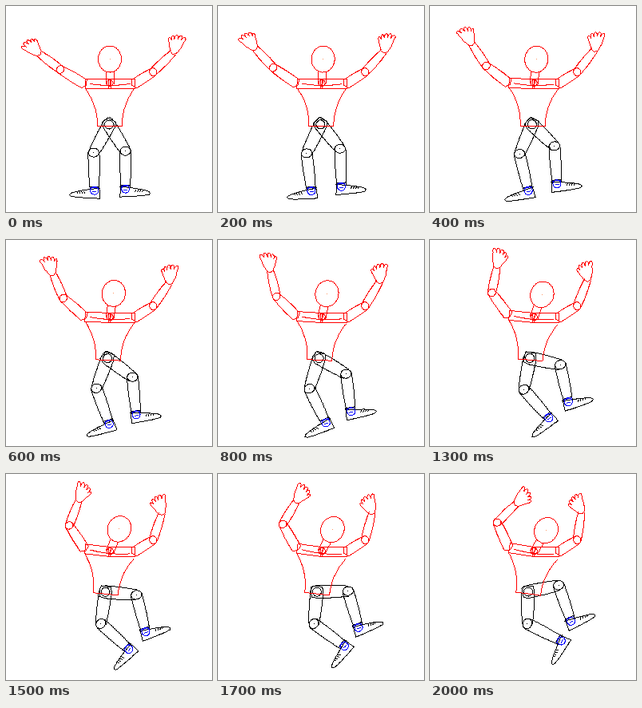
These frames come from a looping animation (258x258 px, 2.1 s). An HTML page with a canvas:

```html
<!DOCTYPE html>
<html lang="en">
<head>
<meta charset="utf-8">
<title>Jointed figure</title>
<style>
html, body { margin: 0; width: 100%; height: 100%; overflow: hidden; background: #fff; }
canvas { display: block; width: 100vw; height: 100vh; image-rendering: pixelated; }
</style>
</head>
<body>
<canvas id="stage" width="258" height="258"></canvas>
<script>
const ctx = document.getElementById('stage').getContext('2d');
const RED = '#f00', BLACK = '#000', BLUE = '#00f';
const STEP = 100, STEPS = 21;
const lerp = (a, b, t) => a + (b - a) * t;

// A joint frame: place, clockwise turn in degrees, mirror.
function joint([x, y], deg, flip = 1) {
  const a = deg * Math.PI / 180, c = Math.cos(a), s = Math.sin(a);
  return ([px, py]) => [x + flip * px * c - py * s, y + flip * px * s + py * c];
}

function line(at, pts, color) {
  ctx.fillStyle = color;
  const p = pts.map(at);
  for (let i = 1; i < p.length; i++) {
    const [x, y] = p[i - 1], dx = p[i][0] - x, dy = p[i][1] - y;
    const n = Math.max(1, Math.ceil(Math.max(Math.abs(dx), Math.abs(dy))));
    for (let k = 0; k <= n; k++) {
      ctx.fillRect(Math.round(x + dx * k / n), Math.round(y + dy * k / n), 1, 1);
    }
  }
}

// Points of f(t) for t from 0 to 1.
const trace = (f, n = 24) => Array.from({ length: n + 1 }, (_, i) => f(i / n));

const dot = (at, x, y, color) => line(at, [[x, y], [x, y]], color);

function oval(at, x, y, rx, ry, color) {
  line(at, trace(t => [x + rx * Math.cos(t * 2 * Math.PI), y + ry * Math.sin(t * 2 * Math.PI)], 48), color);
}

function box(at, x, y, w, h, color) {
  line(at, [[x, y], [x + w, y], [x + w, y + h], [x, y + h], [x, y]], color);
}

// Both sides of a tapered, slightly swollen limb.
function limb(at, len, w0, w1, swell, color) {
  for (const s of [-1, 1]) {
    line(at, trace(t => [s * (lerp(w0, w1, t) + swell * Math.sin(Math.PI * t)), len * t]), color);
  }
}

// Five fingers fan out from the wrist, the thumb being shortest.
function drawHand(at) {
  const fan = trace(k => {
    const a = lerp(-24, 44, k) * Math.PI / 180;
    const r = (24 - 6 * k * k) * (0.78 + 0.22 * Math.sqrt(Math.abs(Math.sin(5 * Math.PI * k))));
    return [r * Math.sin(a), -r * Math.cos(a)];
  }, 40);
  line(at, [[-4, 0], [-7, -9], ...fan, [4, 0], [0, 2], [-4, 0]], RED);
}

function drawShoe(at) {
  const x = k => lerp(-31, 7, k);
  line(at, trace(k => [x(k), 4 - 8 * Math.sqrt(k)]), BLACK);
  line(at, [...trace(k => [x(k), 4 + 5 * k ** 0.3]), [6, -6], [-6, -6]], BLACK);
  for (let i = 0; i < 4; i++) line(at, [[-22 + 3 * i, 0], [-21 + 3 * i, 2]], BLACK);
  oval(at, 0, -1, 5, 5, BLUE);
  line(at, [[-5, -5], [5, -5]], BLUE);
  line(at, [[-2, 0], [2, 0]], BLUE);
}

function arm(shoulder, upLen, foreLen, upDeg, foreDeg, handDeg, flip) {
  const upper = joint(shoulder, upDeg);
  const fore = joint(upper([0, -upLen]), foreDeg);
  limb(upper, -upLen, 6, 5, 0.6, RED);
  limb(fore, -foreLen, 5, 4, 0.8, RED);
  line(upper, [[-6, 0], [0, 3], [6, 0]], RED);
  oval(upper, 0, -upLen, 5, 4.5, RED);
  drawHand(joint(fore([0, -foreLen]), handDeg, flip));
}

function leg(hip, thighLen, thighDeg, shinDeg, footDeg, flip) {
  const thigh = joint(hip, thighDeg, flip);
  const shin = joint(thigh([0, thighLen]), shinDeg, flip);
  limb(thigh, thighLen, 8, 6.5, 0.5, BLACK);
  line(thigh, [[-8, 0], [-6, -7], [6, -7], [8, 0]], BLACK);
  oval(shin, 0, 0, 6.5, 5.5, BLACK);
  dot(shin, 0, 0, BLACK);
  limb(shin, 46, 7, 5.5, 0.6, BLACK);
  drawShoe(joint(shin([0, 48.5]), footDeg, flip));
}

function torso(at) {
  for (const s of [-1, 1]) {
    line(at, trace(t => [s * (15.5 + 15 * (1 - t) ** 2.2), lerp(6, 53, t)]), RED);
  }
  line(at, [[-15, 53], [15, 53]], RED);
  line(at, trace(t => [lerp(-25, 25, t), 2 * Math.sin(Math.PI * t)]), RED);
}

function headAndNeck(at) {
  for (const x of [-5, 5]) line(at, [[x, 0], [x, -15]], RED);
  oval(at, 0, -1, 4, 4, RED);
  line(at, [[0, -4], [0, 3]], RED);
  oval(at, 0, -31, 14.5, 16.5, RED);
  dot(at, 0, -31, '#f96');
}

// Every joint turns at a constant rate from u = 0 to u = 1.
function draw(u) {
  const mix = (a, b) => lerp(a, b, u);
  ctx.fillStyle = '#fff';
  ctx.fillRect(0, 0, 258, 258);

  const neck = [129.5, 97];
  const left = joint(neck, mix(0, 9)), right = joint(neck, 0);
  const hip = [mix(128.5, 122.5), mix(148, 147)];

  leg(hip, 40, mix(28.5, 1.5), mix(-1, -63), mix(0, -60), 1);
  leg(hip, 39, mix(-32, -102), mix(0, -19), mix(0, -24), -1);
  oval(right, hip[0] - neck[0], hip[1] - neck[1], 5.5, 5.5, BLACK);

  torso(joint(neck, mix(0, 7.5)));
  box(left, -31, -6, 32, 12, RED);
  box(right, -2, -6, 33, 12, RED);
  headAndNeck(joint(neck, mix(0, 30)));

  arm(left([-32, 0]), 35, 33, mix(-59, -24.4), mix(-53, 46), mix(-52, 42), 1);
  arm(right([30.5, 0]), 28, 35, 58, mix(46, 9), mix(22, -22), -1);
}

function tick() {
  const step = Math.floor(performance.now() / STEP) % STEPS;
  draw(step / (STEPS - 1));
  requestAnimationFrame(tick);
}
tick();
</script>
</body>
</html>
```
